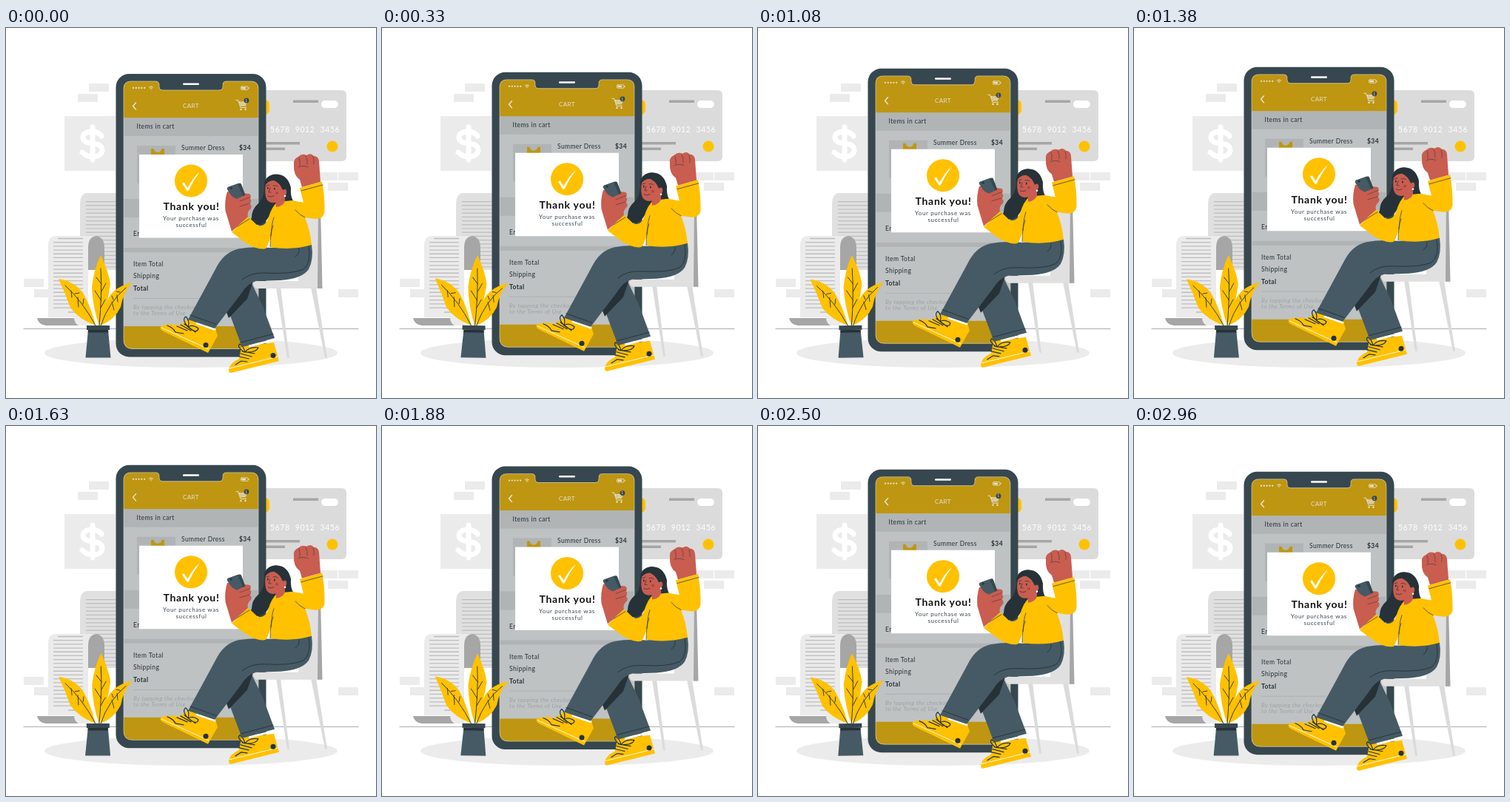
These frames come from a looping animation (500 px wide and 500 px high, 3000 ms). An HTML page:

```html
<!DOCTYPE html>
<html lang="en">
<head>
<meta charset="utf-8">
<title>Purchase complete</title>
<style>
html, body { margin: 0; width: 100%; height: 100%; overflow: hidden; background: #fff; }
svg { display: block; width: 100%; height: 100%; stroke-width: .9; letter-spacing: .4px; }
text { font-family: Lato, "Open Sans", sans-serif; }
.ui { font-size: 8.5px; fill: #263238; }
.b { font-weight: 700; }
.mid { text-anchor: middle; }
.line { fill: none; stroke: #263238; stroke-linecap: round; stroke-linejoin: round; }
.light { fill: none; stroke: #e6e2d6; stroke-linecap: round; stroke-linejoin: round; }
</style>
</head>
<body>
<svg viewBox="0 0 500 500">
  <defs>
    <path id="glass" d="M169 72H202Q207 72 207 77V79Q207 84 212 84H288Q293 84 293 79V77Q293 72 298 72H331Q341 72 341 82V421Q341 433.500 329 433.500H171Q159 433.500 159 421V82Q159 72 169 72Z"/>
    <clipPath id="screen"><use href="#glass"/></clipPath>
  </defs>

  <!-- wall -->
  <path fill="#ebebeb" d="M112 75h27v11h-27zM97 89h27v11h-27zM421 195h27v11h-27zM449 195h27v11h-27zM435 209h27v11h-27zM24 339h27v11h-27zM38 353h27v11h-27zM449 353h27v11h-27zM79 119h69v74H79z"/>
  <path fill="none" stroke="#fff" stroke-width="7" stroke-linecap="round" d="M117 134V178M129 146C125 141 121 140 116 140C108 140 104 144 104 148C104 160 130 152 130 165C130 171 124 174 117 174C111 174 107 172 103 168"/>

  <!-- receipts -->
  <path fill="#e0e0e0" d="M100 240Q100 223 110 223H160V327H100Z"/>
  <path stroke="#bdbdbd" stroke-width="44" stroke-dasharray="1.2 4" d="M130 234V325"/>
  <path fill="#a6a6a6" d="M42 392H94Q93 400 99 402H54Q44 401 42 392Z"/>
  <path fill="#ebebeb" d="M57 293Q57 281 68 281H122L111 300V402H99Q92 400 92 391H57Z"/>
  <path fill="#a6a6a6" d="M122 281Q133 283 133 297V327H111V297Q111 282 122 281Z"/>
  <path stroke="#bdbdbd" stroke-width="40" stroke-dasharray="1.3 3.900" d="M84 289V382"/>
  <path stroke="#bdbdbd" stroke-width="1.300" d="M70 284.500H104M84 384H104"/>

  <!-- bank card -->
  <rect x="300" y="84" width="160" height="96" rx="6" fill="#dbdbdb"/>
  <rect x="330" y="97" width="26" height="20" rx="6" fill="#ffc100"/>
  <path fill="#a6a6a6" d="M388 97.500h34v3.500h-34zM345 154h52v3.500h-52zM345 161.500h32v3.500h-32z"/>
  <rect x="426" y="98" width="23" height="10" rx="5" fill="#fff"/>
  <text x="357" y="140.500" font-size="10.500" letter-spacing=".55" word-spacing="4" fill="#fff">5678 9012 3456</text>
  <circle cx="441" cy="160" r="7.500" fill="#ffc100"/>

  <!-- floor -->
  <ellipse cx="250" cy="439" rx="198" ry="20" fill="#ebebeb"/>
  <path class="line" stroke-width=".4" d="M24 406.500H476"/>

  <g id="float">
    <!-- phone -->
    <rect x="148.500" y="62" width="203" height="382.500" rx="18" fill="#37474f"/>
    <rect x="239" y="74.500" width="22" height="2.500" rx="1.200" fill="#fff"/>
    <g clip-path="url(#screen)">
      <path fill="#bec2c3" d="M159 72h182v362H159z"/>
      <path fill="#be9611" d="M159 72h182v49.600H159zM159 403h182v31H159z"/>
      <path fill="#b0b4b5" d="M159 121.600h182V146H159zM159 231h182v25H159zM159 297h182v6H159zM177 159h52v51h-52z"/>
    </g>
    <use href="#glass" fill="none" stroke="#e3dcc0" stroke-width=".6"/>
    <path class="light" stroke-width="2.300" stroke-dasharray="0 3.800" d="M172 81H188"/>
    <path class="light" stroke-width="1" d="M193.500 80Q196 77.800 198.500 80M194.700 81.500Q196 80.300 197.300 81.500M196 83v.1"/>
    <rect class="light" x="317.500" y="79" width="9.500" height="4.500" rx="1" stroke-width=".8"/>
    <path fill="#e6e2d6" d="M318.500 80h5.500v2.500h-5.500zM327.500 80.200h1v2h-1z"/>
    <path class="light" stroke-width="1.500" d="M175.500 101L171.500 105.500L175.500 110"/>
    <text class="mid" x="250" y="108.500" font-size="8" fill="#e6e2d6">CART</text>
    <path class="light" stroke-width="1" d="M311 97.500H313.500L317 107.500H324.500"/>
    <path fill="#e6e2d6" d="M314 99.500H326L324 105.500H316.500Z"/>
    <path stroke="#be9611" stroke-width=".4" d="M314 101.500H326M315 103.500H325M317.500 99V106M320.300 99V106M323 99V106"/>
    <path class="light" stroke-width="2.400" d="M317.500 110v.1M323.500 110v.1"/>
    <circle cx="325" cy="98" r="3.400" fill="#37474f"/>
    <text class="mid" x="325" y="99.800" font-size="5" fill="#e6e2d6">1</text>

    <text class="ui" x="176.500" y="136.500">Items in cart</text>
    <path fill="#be9611" d="M196 163H199.500Q200.500 168 205 168Q209.500 168 210.500 163H214V172H196Z"/>
    <text class="ui" x="237" y="165.500">Summer Dress</text>
    <text class="ui b" x="315" y="165.500">$34</text>
    <text class="ui" x="172" y="281">Enter code</text>
    <text class="ui" x="172" y="322">Item Total</text>
    <text class="ui" x="172" y="338.500">Shipping</text>
    <text class="ui b" x="172" y="355">Total</text>
    <path stroke="#a9adaf" stroke-width=".8" d="M172 365.500H330"/>
    <g font-size="8" fill="#9da2a4" font-style="italic">
      <text x="172" y="380">By tapping the checkout</text>
      <text x="172" y="388.500">to the Terms of Use</text>
    </g>

    <!-- confirmation -->
    <path fill="#fff" d="M180 171h140v112.500H180z"/>
    <circle cx="250" cy="206.500" r="22" fill="#ffc100"/>
    <path fill="#fff" d="M238 210L240.500 208.500L245.500 216Q252 203 262 194Q253 206 246.500 220H244.500Z"/>
    <text class="mid b" x="250.500" y="246.500" font-size="14" letter-spacing=".75" fill="#111">Thank you!</text>
    <g class="mid" font-size="8" letter-spacing=".63" fill="#37474f">
      <text x="250" y="260">Your purchase was</text>
      <text x="250.500" y="269.500">successful</text>
    </g>

    <!-- chair -->
    <path fill="#dbdbdb" d="M365 350H371L383 446H380ZM412 350H419L434 446H431Z"/>
    <path fill="#e0e0e0" d="M334 342H427V352H338Q334 350 334 342ZM395 235H424L427 350H395Z"/>
    <path fill="#a6a6a6" d="M422 240H425L427.500 352H421Z"/>

    <!-- far leg -->
    <path fill="#ffc100" d="M301 462Q302 453 315 447L318 431L362 425L369 450L304 466Q301 466 301 462Z"/>
    <path fill="none" stroke="#fff" d="M302 460L367.500 444"/>
    <path stroke="#fff" stroke-width="3" d="M328 430L362 421.500"/>
    <circle cx="361" cy="442.500" r="3.500" fill="#263238"/>
    <path class="line" stroke-width="1.200" d="M317 440L332 444M315 444L328 447M319 437L336 440M322 438Q311 430 316 427Q321 430 323 438Q329 430 341 432Q338 439 323 438M310 455L318 450L326 451"/>
    <path fill="#455a64" d="M299 378L331 343L347 376L363 419L319 431Z"/>
    <path fill="#263238" d="M335 339L326 366L301 392L297 382L316 350Z"/>
    <path class="line" d="M317 425L361 413.500"/>

    <!-- near leg -->
    <path fill="#ffc100" d="M209 403Q220 399 234 402L247 393L283 406L286 416L273 439L213 410Q207 407 209 403Z"/>
    <path fill="none" stroke="#fff" d="M210 405L274 434"/>
    <path stroke="#fff" stroke-width="3" d="M257 398.500L283 407.500"/>
    <circle cx="270" cy="428.500" r="3.500" fill="#263238"/>
    <path class="line" stroke-width="1.200" d="M231 403L245 409M236 401L250 409M241 400L256 411M246 404Q237 394 243 390Q249 396 246 404Q252 400 260 406Q258 414 246 404M218 402Q226 405 229 411L240 413"/>
    <path fill="#455a64" d="M357 297L413 293Q416 313 409 326Q400 339 371 341L338 342Q326 345 317 360L282 406L246 394Q263 363 283 326Q294 303 314 298.500Q333 295 357 297Z"/>
    <path class="line" d="M249 388L284 400.500M396 298Q397 305 391 309M409 295Q413 318 402 326Q387 333 350 331Q331 330 319 340"/>

    <!-- hair -->
    <path fill="#263238" d="M365 197.500Q352 198 349 210Q350 229 341 237Q332 245 332 256L329 262Q345 273 356 254Q362 244 368 239L389 235.500Q384 228 385 216Q381 198 365 197.500Z"/>

    <!-- torso and raised arm -->
    <path fill="#c85d50" d="M389 184Q388 177 395 174Q400 169 406 172Q412 168 416 173Q422 173 423 180L425 208L400 215L397 205Q388 199 389 184Z"/>
    <path class="line" stroke-width=".5" d="M396 175Q398 181 397 186M405 173Q408 179 407 184M415 174Q417 179 416 184M395 188Q402 185 408 188"/>
    <path fill="#ffc100" d="M397 216L427 207.500Q431 227 430.500 249Q429 258 418 258L404 256Q411 273 413 293Q386 301 357 296L358 281Q354 294 351 298Q340 301 322 289L305 276L327 254.500L340 267Q350 269 354 258Q359 241 367 235L387 233L402 236Z"/>
    <path class="line" stroke-width=".7" d="M399 220L428 212M357 296Q357 278 361 267M404 256Q397 253 391 246M308 271L329 258M362 256Q359 264 358 281"/>
    <path fill="#c85d50" d="M364 230L377 225L377 234Q374 241 365 242Z"/>

    <!-- face -->
    <path fill="#c85d50" d="M351 211Q349 223 352 231Q356 238 365 235.500Q374 233 377 227Q381 222 378 218Q374 217 373 209Q365 204 360 205Q355 205 351 211Z"/>
    <path fill="#263238" d="M349 214Q354 206 362 206Q370 209 374 219L379 217Q383 200 365 198Q349 199 349 214Z"/>
    <path class="line" stroke-width=".7" d="M352 213L356 212M361 213Q365 212 367 214M357 216L355 222L358 222M354 227Q358 229.500 362 227"/>
    <path fill="#263238" d="M353 215h1.600v2.600h-1.600zM362 216h1.600v2.600h-1.600z"/>
    <circle cx="366" cy="223" r="2" fill="#b8433b"/>
    <circle cx="377" cy="227" r="1.300" fill="#fff"/>

    <!-- hand with phone -->
    <path fill="#c85d50" d="M299 221Q295 234 296.500 247L305 275L327 255Q325 249 331 244Q333 239 329 238Q333 234 330 231Q332 226 328 224Z"/>
    <path fill="#37474f" d="M300 215L314 210Q317 209 318 211L325 230L314 236Q311 237 310 234L299 218Q298 216 300 215Z"/>
    <path fill="#455a64" d="M300 215L313 210.500L322 231L313 236Q311 237 310 234L299 218Z"/>
    <path fill="#263238" d="M302 216L305 215L306 217L303 218Z"/>
    <path fill="#c85d50" d="M299 221Q306 229 312 231L327 224Q332 224 330 229L319 234L327 231Q333 232 329 237L318 241Q306 248 299 240Z"/>
    <path class="line" stroke-width=".5" d="M316 234L329 229M316 241L330 237"/>
  </g>

  <g id="plant">
    <path fill="#455a64" d="M111 408H138L141.500 445.500H107.500Z"/>
    <path fill="#263238" d="M111 408H138L138.300 411.500H110.700Z"/>
    <path fill="#ffc100" d="M71 339Q92 342 104 358Q115 377 121 402Q99 394 87 378Q80 358 71 339Z"/>
    <path fill="#ffc100" d="M170.500 344Q148 349 139 364Q130 380 128 402Q147 394 155 377Q158 358 170.500 344Z"/>
    <path fill="#ffc100" d="M128 307Q139 330 141 346Q137 376 126 403Q117 377 116 350Q119 325 128 307Z"/>
    <path class="line" d="M80 348Q104 370 121 402M88 355L89 364M97 364L98 377M93 359L99 358M104 373L105 366M128 325Q130 360 126 402M129 346L122 337M128.500 368L120 355M129 356L135 345M128 378L134 367M162 351Q139 370 128 402M150 361L151 370M143 370L146 381M154 357L149 356M145 367L143 362"/>
    <rect x="109" y="402" width="31" height="6" fill="#37474f"/>
  </g>
</svg>
<script>
const floater = document.getElementById('float');
const plant = document.getElementById('plant');
// Triangle wave: 0 at p=0, 1 at p=.25, -1 at p=.75
const tri = p => p < .25 ? p * 4 : p < .75 ? 2 - p * 4 : p * 4 - 4;
const start = performance.now();

function draw(now) {
  const t = Math.max(0, now - start) % 3000;
  const lift = 10 * (1 - Math.abs(t / 1500 - 1));
  const sway = tri(t % 1500 / 1500);
  floater.setAttribute('transform', `translate(0 ${-lift})`);
  plant.setAttribute('transform', `rotate(${sway} 121 376)`);
  requestAnimationFrame(draw);
}
draw(start);
</script>
</body>
</html>
```
